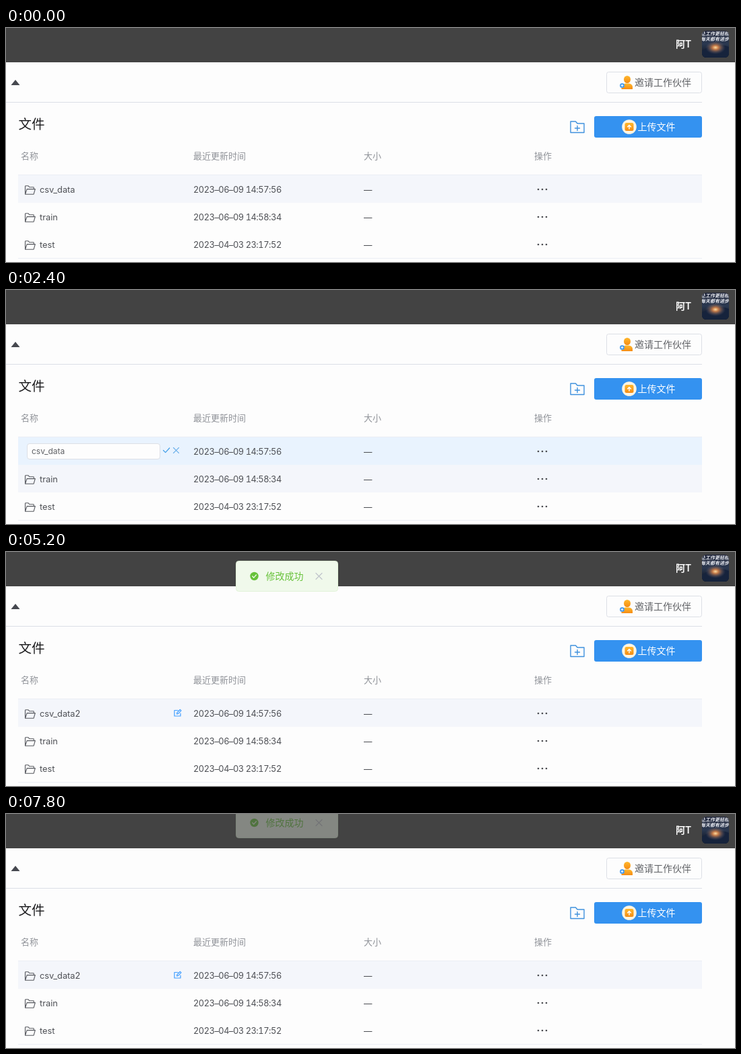
These frames come from a looping animation (1082x348 px, 8000 ms). An HTML page:

```html
<!DOCTYPE html>
<html lang="zh">
<head>
<meta charset="utf-8">
<title>文件</title>
<style>
  html, body { margin: 0; width: 100%; height: 100%; overflow: hidden; background: #fdfdfd; }
  svg { display: block; width: 1082px; height: 348px; }
  text { font-family: Inter, "Noto Sans CJK SC", "Noto Sans CJK", sans-serif; font-size: 14px; white-space: pre; }
  .cell { font-size: 12.8px; fill: #4e5055; }
  .date { font-variant-numeric: tabular-nums; letter-spacing: -.45px; }
  .head { font-size: 13px; fill: #909399; }
  .line { fill: none; stroke-linecap: round; stroke-linejoin: round; }
</style>
</head>
<body>
<svg viewBox="0 0 1082 348" xmlns="http://www.w3.org/2000/svg">
  <defs>
    <linearGradient id="space" x1="0" y1="0" x2="0" y2="1">
      <stop offset="0" stop-color="#23283c"/>
      <stop offset=".5" stop-color="#2a3850"/>
      <stop offset="1" stop-color="#080c16"/>
    </linearGradient>
    <radialGradient id="glow">
      <stop offset="0" stop-color="#ffdca0"/>
      <stop offset=".3" stop-color="#c47a48"/>
      <stop offset="1" stop-color="#4a5068" stop-opacity="0"/>
    </radialGradient>
    <linearGradient id="amber" x1="0" y1="0" x2="0" y2="1">
      <stop offset="0" stop-color="#ffb82c"/>
      <stop offset="1" stop-color="#f58c14"/>
    </linearGradient>
    <filter id="shade" x="-20%" y="-20%" width="140%" height="140%">
      <feDropShadow dx="0" dy="2" stdDeviation="4" flood-color="#000" flood-opacity=".12"/>
    </filter>
    <clipPath id="face"><rect x="1033" y="4" width="40" height="40" rx="6"/></clipPath>
    <g id="folder" class="line" stroke="#56585e" stroke-width="1.1">
      <path d="M1 13.2V1.6Q1 .8 1.8.8H5.6L7.4 2.8H13Q13.8 2.8 13.8 3.6V5.6M1 13.2L3.6 5.6H15.8L13.6 13.2Z"/>
    </g>
    <g id="dots" fill="#4a4b50">
      <circle cx="-6" r="1.3"/><circle r="1.3"/><circle cx="6" r="1.3"/>
    </g>
  </defs>

  <rect width="1082" height="348" fill="#fdfdfd"/>
  <rect width="1082" height="51" fill="#434343"/>
  <text x="994" y="29" fill="#fff" font-weight="600">阿T</text>
  <g clip-path="url(#face)">
    <rect x="1033" y="4" width="40" height="40" fill="url(#space)"/>
    <path d="M1033 34Q1052 20 1073 28V44H1033Z" fill="#16233c"/>
    <ellipse cx="1053" cy="29" rx="15" ry="10" fill="url(#glow)"/>
    <g fill="#eceef4" font-style="italic" font-weight="600">
      <text x="1031" y="11" style="font-size:7px">让工作更轻松</text>
      <text x="1031" y="19" style="font-size:7px">每天都有进步</text>
    </g>
  </g>

  <path d="M7.5 85L14 77L20.5 85Z" fill="#46484f"/>
  <rect y="110" width="1033" height="1" fill="#dcdfe6"/>
  <rect x="891.5" y="65.5" width="141" height="31" rx="3" fill="#fdfdfd" stroke="#dcdfe6"/>
  <g fill="url(#amber)">
    <ellipse cx="922" cy="76.5" rx="5" ry="5.5"/>
    <path d="M913.5 91V88Q914 83.5 919 82.5H925Q930 83.5 930 88V91Z"/>
  </g>
  <circle cx="914.5" cy="85.5" r="3.5" fill="#4a9ef0"/>
  <path d="M912.7 85.5H916.3M914.5 83.7V87.3" stroke="#fff"/>
  <text x="933" y="86" fill="#606266">邀请工作伙伴</text>

  <text x="18.5" y="150" fill="#1c1c1e" style="font-size:19.5px">文件</text>
  <g class="line" stroke="#3f91dd" stroke-width="1.4">
    <path d="M838 155.5V139H845.5L848 142H858V155.5Z"/>
    <path d="M848 145.5V152.5M844.5 149H851.5"/>
  </g>
  <rect x="873" y="131" width="160" height="32" rx="3" fill="#3492f0"/>
  <circle cx="925" cy="147" r="10.8" fill="#fff5e2"/>
  <rect x="918.5" y="141" width="13" height="12" rx="2.5" fill="url(#amber)"/>
  <path d="M925 150V144.5M922.5 147L925 144.5L927.5 147" class="line" stroke="#fff" stroke-width="1.4"/>
  <text x="937.5" y="152" fill="#fff">上传文件</text>

  <text class="head" x="22" y="195">名称</text>
  <text class="head" x="278" y="195">最近更新时间</text>
  <text class="head" x="531" y="195">大小</text>
  <text class="head" x="784" y="195">操作</text>

  <g id="rows"></g>

  <g id="pen" class="line" stroke="#409eff" stroke-width="1.2">
    <path d="M255 235.5H250V244H259V240M253.5 241L254 238.7L258.5 234.3L260 235.8L255.7 240.4Z"/>
  </g>

  <g id="editor">
    <rect id="field" x="31.5" y="228.5" width="197" height="23" rx="3.5" fill="#fdfdfd"/>
    <text id="value" x="38" y="244" fill="#606266" style="font-size:12px"></text>
    <rect id="caret" y="231" width="1" height="17" fill="#303133"/>
    <path id="tick" class="line" d="M-4.5 0L-1.3 3.2L4.7 -3.5" stroke="#409ee8" stroke-width="1.2"/>
    <path class="line" d="M248.5 234.5L256.5 242.5M256.5 234.5L248.5 242.5" stroke="#6ab0ea" stroke-width="1.1"/>
  </g>

  <g id="menu">
    <path d="M788 264.5H792L797 259.5L802 264.5H880Q884 264.5 884 268.5V336Q884 340 880 340H788.5Q784.5 340 784.5 336V268.5Q784.5 264.5 788 264.5Z"
      fill="#fdfdfd" stroke="#ebeef5" filter="url(#shade)"/>
    <path class="line" stroke="#4f9fe6" stroke-width="1.1" d="M809 281.5H802.5V290.5H809M813.5 281.5H816V290.5H813.5M811.3 279V293M809.5 279H813M809.5 293H813M805 286H808.5"/>
    <text x="825" y="291" fill="#606266">重命名</text>
    <path class="line" d="M803.5 314.5H815.5M807 314V312H812V314M805 314.5V324.5H814V314.5" stroke="#d04a30" stroke-width="1.2"/>
    <text x="825" y="323" fill="#d04a30">删除</text>
  </g>

  <g id="toast">
    <rect x="341.5" y="13.5" width="151" height="45" rx="4" fill="#f0f9eb" stroke="#e1f3d8"/>
    <circle cx="368.5" cy="36" r="6.2" fill="#67c23a"/>
    <path class="line" d="M365.7 36L367.8 38.2L371.4 34" stroke="#f0f9eb" stroke-width="1.3"/>
    <text x="385.5" y="41" fill="#67c23a">修改成功</text>
    <path class="line" d="M460 31.5L469 40.5M469 31.5L460 40.5" stroke="#c0c4cc" stroke-width="1.2"/>
  </g>
</svg>
<script>
  const LOOP = 8000, STEP = 200;
  const PLAIN = '#fdfdfd', HOVER = '#f4f6fb', CURRENT = '#e9f3fe';
  const $ = id => document.getElementById(id);

  const files = [
    ['csv_data', '2023–06–09 14:57:56'],
    ['train', '2023–06–09 14:58:34'],
    ['test', '2023–04–03 23:17:52']
  ];

  $('rows').innerHTML = files.map(([name, date], i) => {
    const mid = 240 + 41 * i;
    return `<rect id="row${i}" x="18" y="${mid - 21}" width="1015" height="41" fill="${PLAIN}"/>
      <rect x="18" y="${mid + 20}" width="1015" height="1" fill="#ebeef5"/>
      <g id="name${i}">
        <use href="#folder" x="27.5" y="${mid - 6}"/>
        <text id="label${i}" class="cell" x="50" y="${mid + 5}">${name}</text>
      </g>
      <text class="cell date" x="278" y="${mid + 5}">${date}</text>
      <text class="cell date" x="531" y="${mid + 5}">––</text>
      <use href="#dots" x="796" y="${mid}"/>`;
  }).join('') + '<rect x="18" y="218" width="1015" height="1" fill="#ebeef5"/>';

  const clamp = x => Math.max(0, Math.min(1, x));
  const ramp = (t, from, to) => clamp((t - from) / (to - from));
  const within = (t, from, to) => t >= from && t < to;
  const show = (id, on) => $(id).setAttribute('visibility', on ? 'visible' : 'hidden');
  const set = (id, attrs) => {
    for (const key in attrs) $(id).setAttribute(key, attrs[key]);
  };

  function mix(a, b, k) {
    const part = (c, i) => parseInt(c.slice(i, i + 2), 16);
    return `rgb(${[1, 3, 5].map(i => Math.round(part(a, i) + (part(b, i) - part(a, i)) * k))})`;
  }

  // The pointer leaves and re-enters the first row twice.
  function drawRows(t) {
    const away = ramp(t, 600, 1000) - ramp(t, 2400, 2600)
      + ramp(t, 6000, 6400) - ramp(t, 7000, 7400);
    const second = ramp(t, 1800, 2200) - ramp(t, 2400, 2800);
    set('row0', { fill: mix(HOVER, CURRENT, away) });
    set('row1', { fill: mix(PLAIN, HOVER, second) });
  }

  function drawEditor(t) {
    const editing = within(t, 1600, 5000), typed = t >= 3400;
    const caretOn = within(t, 2800, 3200) || within(t, 3400, 4000) || within(t, 4400, 4800);
    const focus = ramp(t, 2600, 3000) - ramp(t, 4600, 5000);
    show('editor', editing);
    show('name0', !editing);
    $('label0').textContent = editing || t < 1600 ? 'csv_data' : 'csv_data2';
    $('value').textContent = typed ? 'csv_data2' : 'csv_data';
    set('field', { stroke: mix('#dcdfe6', '#409eff', focus) });
    set('caret', { x: typed ? 94 : 87 });
    show('caret', caretOn);
    set('tick', { transform: `translate(238 238.5) scale(${t >= 4600 ? 1.25 : 1})` });
    show('pen', within(t, 5000, 6200) || t >= 7400);
  }

  function drawOverlays(t) {
    set('menu', { opacity: ramp(t, 200, 600) - ramp(t, 1600, 2000) });
    const leaving = ramp(t, 7600, 8000);
    const rise = ramp(t, 4600, 5140);
    set('toast', {
      opacity: t < 5000 ? 0 : ramp(t, 4700, 5100) * (1 - 1.25 * leaving),
      transform: `translate(0 ${-46 * (1 - rise + leaving)})`
    });
  }

  function draw(now) {
    const t = Math.floor((now % LOOP) / STEP) * STEP;
    drawRows(t);
    drawEditor(t);
    drawOverlays(t);
  }

  const start = performance.now();
  function tick() {
    draw(performance.now() - start);
    requestAnimationFrame(tick);
  }
  tick();
</script>
</body>
</html>
```
